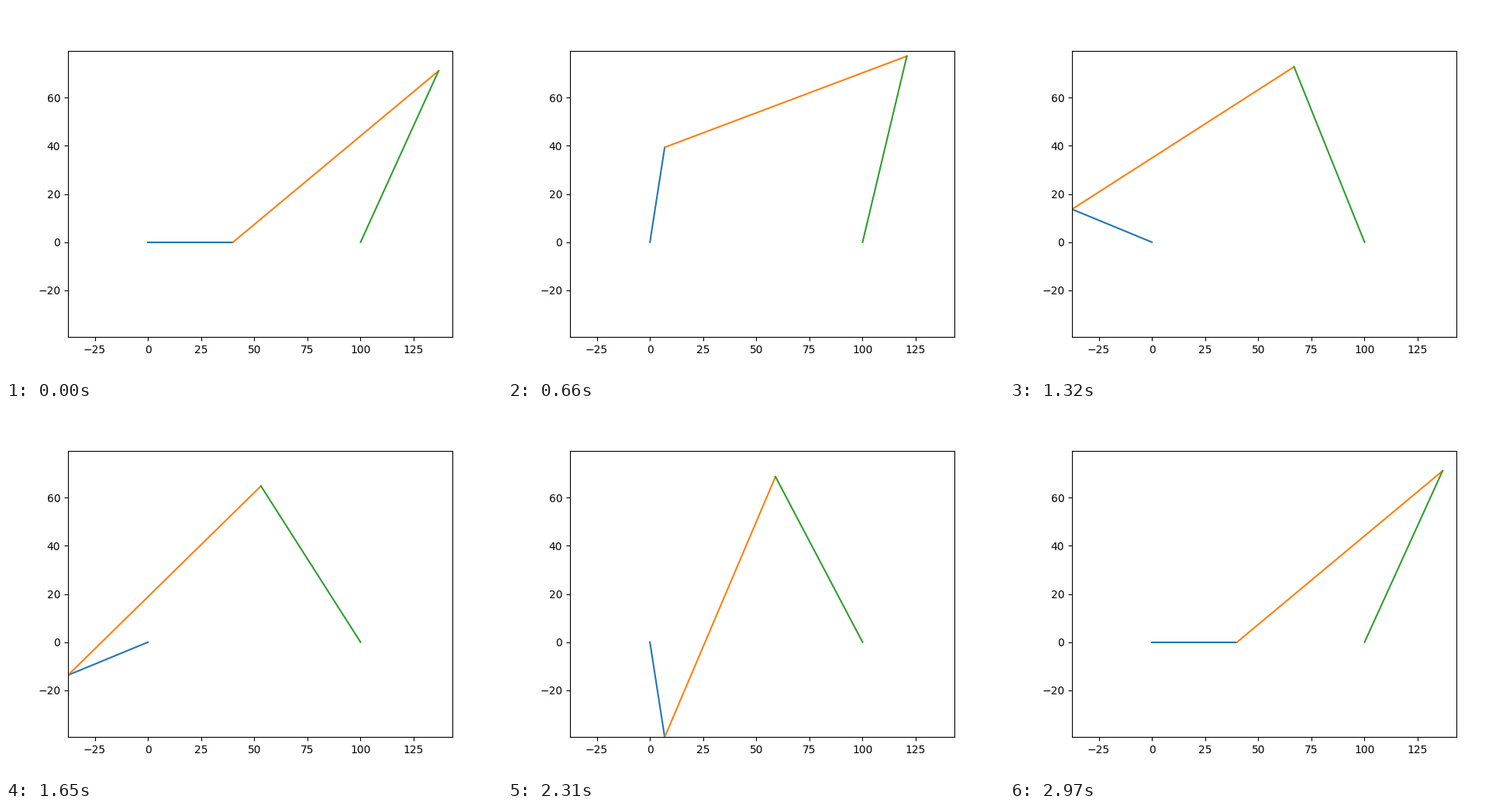
A matplotlib script for the animation above (3.3 s loop, 640 px wide and 480 px high).

```python
import matplotlib.pyplot as plt
import numpy as np
from matplotlib.animation import FuncAnimation

# Four-bar linkage: crank, coupler and rocker on a fixed ground link.
CRANK, COUPLER, ROCKER, GROUND = 40, 120, 80, 100
FRAMES, LOOP_MS = 10, 3300

theta = np.linspace(0, 2 * np.pi, FRAMES)
crank_x, crank_y = CRANK * np.cos(theta), CRANK * np.sin(theta)

# The upper joint is the upper intersection of the coupler and rocker circles.
dx, dy = GROUND - crank_x, -crank_y
dist = np.hypot(dx, dy)
along = (COUPLER**2 - ROCKER**2 + dist**2) / (2 * dist)
height = np.sqrt(COUPLER**2 - along**2)
joint_x = crank_x + (along * dx - height * dy) / dist
joint_y = crank_y + (along * dy + height * dx) / dist

fig, ax = plt.subplots(figsize=(6.4, 4.8), dpi=100)
all_x = np.concatenate([[0, GROUND], crank_x, joint_x])
all_y = np.concatenate([[0], crank_y, joint_y])
ax.set_xlim(all_x.min(), all_x.max())
ax.set_ylim(all_y.min(), all_y.max())
links = [ax.plot([], [], color=c, lw=1.5)[0] for c in ("C0", "C1", "C2")]


def update(i):
    xs = (0, crank_x[i], joint_x[i], GROUND)
    ys = (0, crank_y[i], joint_y[i], 0)
    for k, link in enumerate(links):
        link.set_data(xs[k:k + 2], ys[k:k + 2])
    return links


anim = FuncAnimation(fig, update, frames=FRAMES, interval=LOOP_MS / FRAMES,
                     repeat=True, repeat_delay=0)
plt.show()
```
